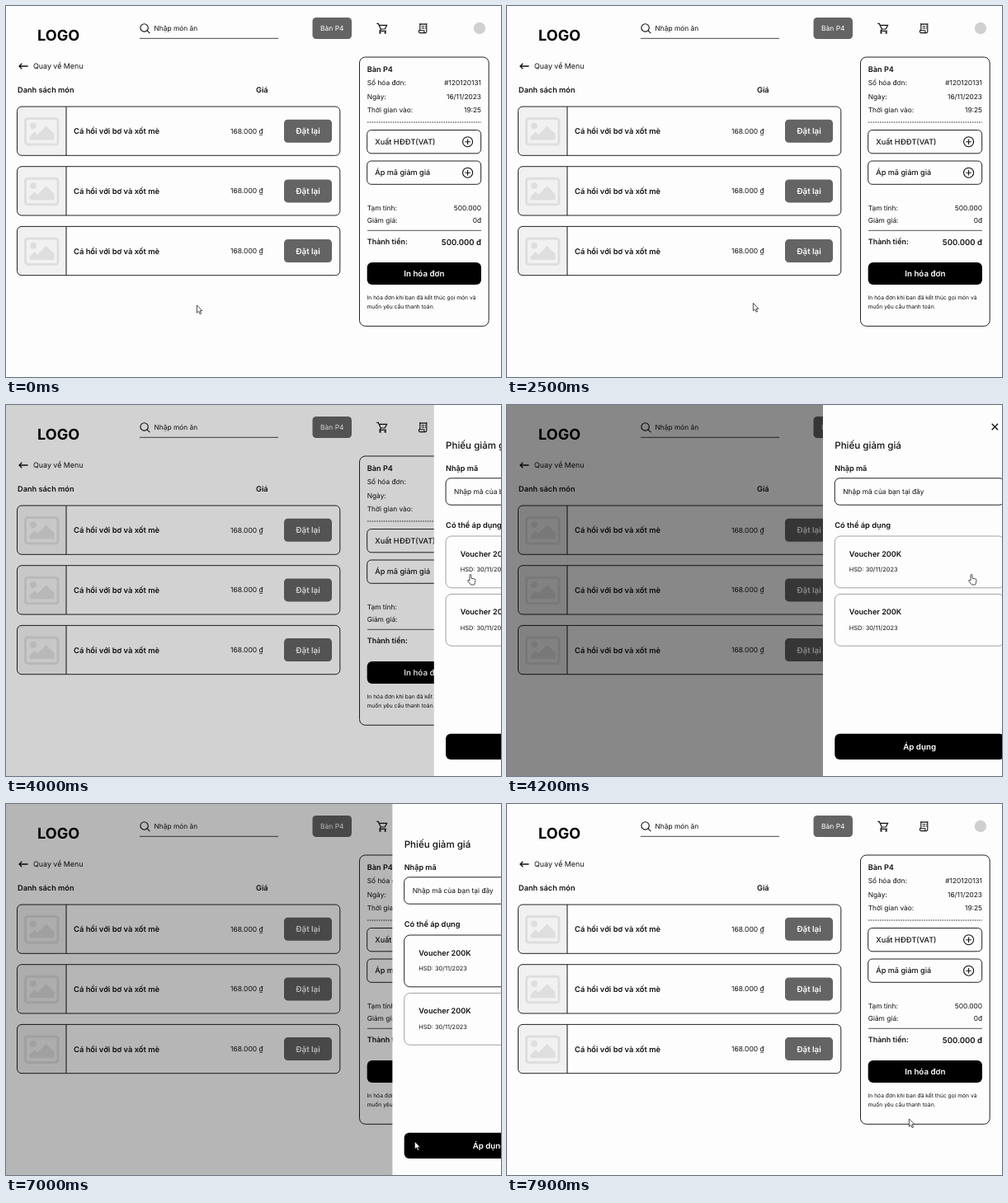
Recreate the animation shown at these times as an HTML page. Size 600x450 px, loop 8000 ms.

```html
<!DOCTYPE html>
<html lang="vi">
<head>
<meta charset="utf-8">
<title>Hóa đơn</title>
<style>
html, body { margin: 0; width: 100%; height: 100%; overflow: hidden; background: #fefdfe; }
svg { display: block; width: 100vw; height: 100vh; font-family: Inter, Roboto, sans-serif; text-rendering: geometricPrecision; }
</style>
</head>
<body>
<svg id="stage" viewBox="0 0 600 450"></svg>
<script>
const INK = '#111', PAPER = '#fefdfe', GREY = '#656465';
const LOOP = 8000, STEP = 100, SLIDE = 446, OPEN = 3941, CLOSE = 6922;

const text = (x, y, s, size = 8.35, weight = 400, fill = INK, anchor = 'start') =>
  `<text x="${x}" y="${y}" font-size="${size}" font-weight="${weight}" fill="${fill}" text-anchor="${anchor}">${s}</text>`;
const box = (x, y, w, h, r, fill = 'none', stroke = 'none', extra = '') =>
  `<rect x="${x}" y="${y}" width="${w}" height="${h}" rx="${r}" fill="${fill}" stroke="${stroke}" ${extra}/>`;
const line = (d, width = 1, stroke = INK, extra = '') =>
  `<path d="${d}" fill="none" stroke="${stroke}" stroke-width="${width}" ${extra}/>`;
const ring = (x, y, r, width = 1) =>
  `<circle cx="${x}" cy="${y}" r="${r}" fill="none" stroke="${INK}" stroke-width="${width}"/>`;
const button = (x, y, w, h, r, label, fill, size = 9.75, weight = 600) =>
  box(x, y, w, h, r, fill) + text(x + w / 2, y + h / 2 + size * 0.36, label, size, weight, '#fff', 'middle');

function header() {
  const cart = line('M449.3 21.4h2l3 6.6h4.9l2.4-4.7h-8.8M454.3 28l-1.3 2.4h8', 1.2) +
    [453.5, 459.7].map(x => `<circle cx="${x}" cy="32.4" r="1.2" fill="${INK}"/>`).join('');
  const bill = line('M501.8 30V21.6l1 .8 1-.8 1 .8 1-.8 1 .8 1-.8 1 .8 1-.8V31q0 1.6-1.5 1.6h-6.3q-1.5 0-1.5-1.4V29.8h6.4v1.4q0 1.4 1.4 1.4M503.6 24.7h3.6M503.6 27h3.6M508 24.7h1M508 27h1', 1.1);
  return text(38, 41.6, 'LOGO', 18.1, 700, '#000') +
    ring(167.6, 26.4, 4.7, 1.1) + line('M171 29.8l3.4 3.4', 1.1) +
    text(179.5, 30, 'Nhập món ăn', 8.4) + line('M162 39.3H330', 1, '#444') +
    button(371.5, 14, 47.5, 26, 4.5, 'Bàn P4', GREY, 8.5, 400) + cart + bill +
    '<circle cx="574" cy="27" r="7.2" fill="#d0cfd1"/>' +
    line('M26.5 73H16M19.3 69.8L16 73l3.3 3.2', 1.3) +
    text(33, 76.3, 'Quay về Menu', 8.9);
}

function dish(i) {
  const pale = '#dfdedf';
  return `<g transform="translate(0 ${122 + i * 72.7})">` +
    '<path d="M73 0V59.3H18.5a5 5 0 0 1-5-5V5a5 5 0 0 1 5-5z" fill="#f2f1f2"/>' +
    box(23.5, 14.5, 39.5, 31.5, 3, 'none', pale, 'stroke-width="3"') +
    `<circle cx="33" cy="23.3" r="3.9" fill="${pale}"/>` +
    `<path d="M28.5 40.5v-4l6-6 3.7 3.5 10.5-10.4 9.8 9.7v7.2z" fill="${pale}"/>` +
    line('M73 0V59.3') + box(13.5, 0, 391.3, 59.3, 5.5, 'none', '#222') +
    text(82, 33.2, 'Cá hồi với bơ và xốt mè', 9.37, 600) +
    text(272, 32.8, '168.000 ₫', 8.5) +
    button(337, 15.7, 58, 28, 4.5, 'Đặt lại', GREY) + '</g>';
}

function summary() {
  const pair = (y, label, value) => text(437.7, y, label) + text(576, y, value, 8.35, 400, INK, 'end');
  const option = (y, label) => box(437.7, y, 138, 28.3, 5, 'none', '#222') +
    text(447.3, y + 17.4, label, 9.1, 500) + ring(559.6, y + 14.2, 6, 1.1) +
    line(`M556.4 ${y + 14.2}h6.4m-3.2-3.2v6.4`, 1.1);
  return box(428.5, 62, 156.7, 326.3, 7, 'none', '#222') +
    text(437.7, 80.2, 'Bàn P4', 9.17, 600) +
    pair(96.2, 'Số hóa đơn:', '#120120131') + pair(112.6, 'Ngày:', '16/11/2023') +
    pair(128.8, 'Thời gian vào:', '19:25') +
    line('M438 141H576', 1, '#333', 'stroke-dasharray="1.6 1.2"') +
    option(150.5, 'Xuất HĐĐT(VAT)') + option(188, 'Áp mã giảm giá') +
    pair(248.3, 'Tạm tính:', '500.000') + pair(262.5, 'Giảm giá:', '0đ') +
    line('M438 272.3H576', 1, '#555') +
    text(437.7, 289.3, 'Thành tiền:', 9, 600) +
    text(576, 289.5, '500.000 đ', 9.55, 600, INK, 'end') +
    button(437.7, 311, 138.3, 27, 6, 'In hóa đơn', '#000') +
    text(437.5, 355.6, 'In hóa đơn khi bạn đã kết thúc gọi món và', 6.7) +
    text(437.5, 367.3, 'muốn yêu cầu thanh toán.', 6.7);
}

function drawer() {
  const voucher = (y, id) => box(380, y, 205.7, 62.8, 7, 'none', '#a3a2a3', `id="${id}"`) +
    text(397.6, y + 24.6, 'Voucher 200K', 9.1, 600) +
    text(397.6, y + 43.2, 'HSD: 30/11/2023', 7.4);
  return box(365.7, 0, 234.3, 450, 0, PAPER) +
    line('M570.4 22.8l7.4 7.4m0-7.4l-7.4 7.4', 1.3) +
    text(380, 52.7, 'Phiếu giảm giá', 11.55, 500) +
    text(380, 79.5, 'Nhập mã', 9.1, 600) +
    box(380, 88.8, 205.7, 32.4, 6, 'none', '#222') +
    text(390, 107.8, 'Nhập mã của bạn tại đây', 8.4) +
    text(380, 148.8, 'Có thể áp dụng', 9.25, 600) +
    voucher(159, 'first') + voucher(229.4, 'second') +
    button(380, 398.7, 205.7, 31.3, 6, 'Áp dụng', '#000');
}

const stage = document.getElementById('stage');
stage.innerHTML = box(0, 0, 600, 450, 0, PAPER) + header() +
  text(14, 105.4, 'Danh sách món', 9.2, 600) + text(303, 105.4, 'Giá', 9.2, 600) +
  [0, 1, 2].map(dish).join('') + summary() +
  box(0, 0, 600, 450, 0, '#000', 'none', 'id="shade"') +
  `<g id="drawer">${drawer()}</g>` +
  '<g id="cursor" fill="#fff" stroke="#222" stroke-width=".8" stroke-linejoin="round">' +
  '<path id="arrow" d="M.4.4V9.7L2.6 7.7 4.1 11.2 5.6 10.5 4.1 7.2H7z"/>' +
  '<path id="hand" d="M-1 8V1.5a1 1 0 0 1 2 0V5.2l4 .8q1.2.4 1 1.8l-.6 3-.8 2.2H.4L-3.2 8.6q-.6-1 .4-1.3z"/></g>';

const [shade, panel, first, cursor, arrow, hand] =
  ['shade', 'drawer', 'first', 'cursor', 'arrow', 'hand'].map(id => document.getElementById(id));

const clamp = u => Math.min(1, Math.max(0, u));
const easeOut = u => 1 - (1 - clamp(u)) ** 3;
const smooth = u => u * u * (3 - 2 * u);

// cursor tip: time, x, y
const path = [
  [0, 231, 362.5], [1600, 231, 362.5], [1700, 298, 359.5], [2400, 298, 359.5],
  [2500, 298, 360], [2800, 298, 360], [3700, 563, 205], [4700, 563, 205],
  [5300, 524, 184], [5500, 524, 184], [6100, 512, 348.5], [6300, 510, 384],
  [6700, 503, 409.5], [6800, 503, 409.5], [6900, 495, 409], [7000, 495, 409],
  [7300, 486, 402], [7600, 486, 402], [7900, 487, 381.5], [8000, 487, 381.5]
];

function tip(t) {
  const i = path.findIndex(p => p[0] > t);
  const [t0, x0, y0] = path[i - 1], [t1, x1, y1] = path[i];
  const u = smooth((t - t0) / (t1 - t0));
  return [x0 + (x1 - x0) * u, y0 + (y1 - y0) * u];
}

function draw(now) {
  const t = Math.floor((now % LOOP) / STEP) * STEP;
  const shown = easeOut((t - OPEN) / SLIDE) - easeOut((t - CLOSE) / SLIDE);
  shade.setAttribute('opacity', shown * 0.5);
  panel.setAttribute('transform', `translate(${234.3 * (1 - shown)} 0)`);
  panel.setAttribute('visibility', shown > 0 ? 'visible' : 'hidden');
  first.setAttribute('stroke', t >= 5500 ? '#222' : '#a3a2a3');

  const [x, y] = tip(t);
  const pointing = (t >= 3800 && t < 6900) && (y < 292 || y > 399);
  cursor.setAttribute('transform', `translate(${x} ${y})`);
  arrow.setAttribute('visibility', pointing ? 'hidden' : 'visible');
  hand.setAttribute('visibility', pointing ? 'visible' : 'hidden');
}

const start = performance.now();
function tick() {
  draw(performance.now() - start);
  requestAnimationFrame(tick);
}
tick();
</script>
</body>
</html>
```
